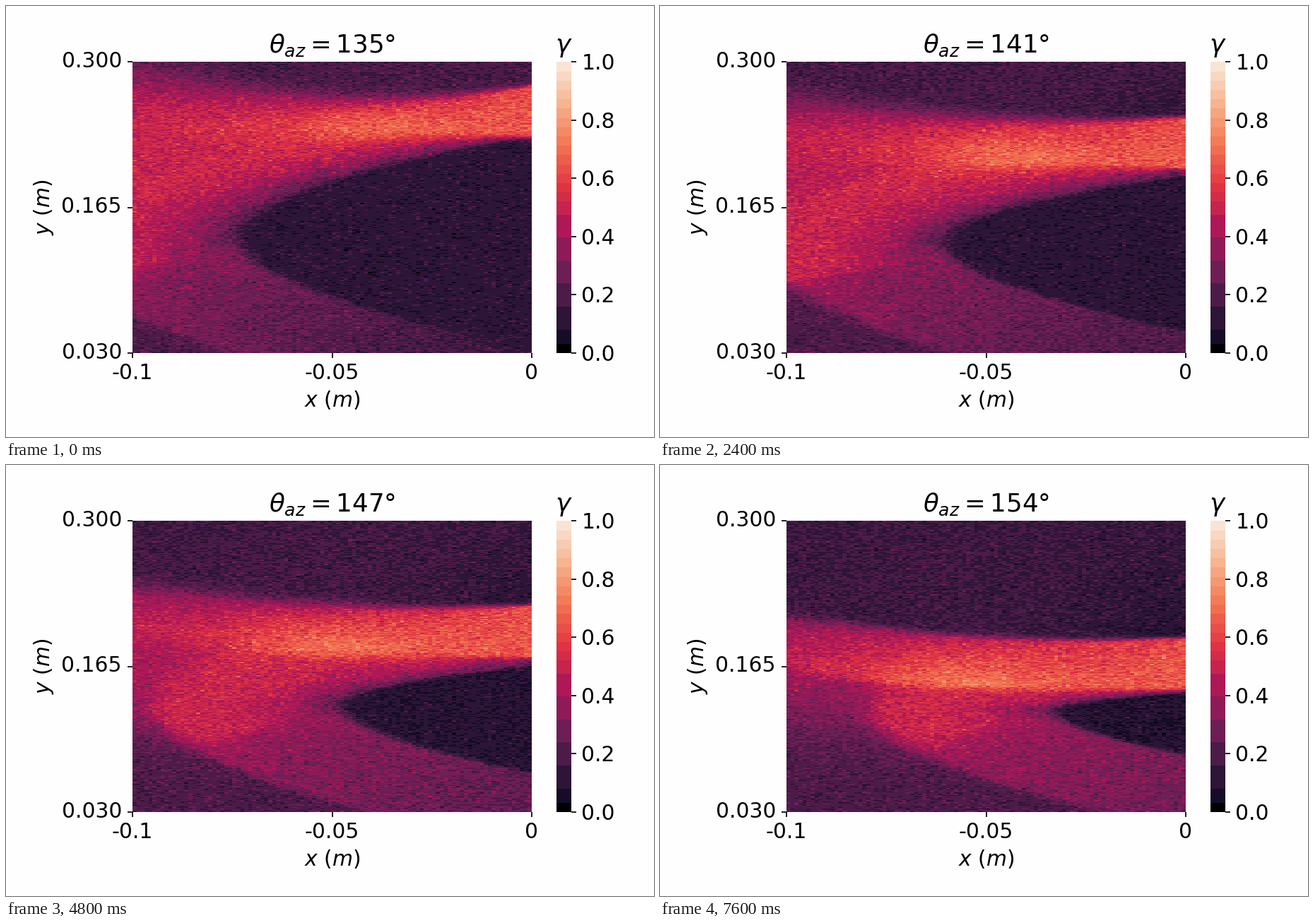
A matplotlib script for the animation above (8000 ms loop, 917 by 611 pixels).

```python
import numpy as np
import matplotlib.pyplot as plt
from matplotlib.animation import FuncAnimation
from matplotlib.colors import BoundaryNorm, LinearSegmentedColormap, ListedColormap

W, H, DPI = 917, 611, 64
FRAMES, INTERVAL = 20, 400
LEFT, RIGHT, TOP, BOTTOM = 179, 744, 79, 492
COLS, ROWS = 100, 270
SAMPLES = 100
TEXT, LARGE = 29.7, 35.65

plt.rcParams["font.family"] = "DejaVu Sans"
plt.rcParams["mathtext.fontset"] = "dejavusans"

# Colour scale: dark violet to cream, with coarser steps in the dark half
RAMP = LinearSegmentedColormap.from_list("ramp", [
    "#03051a", "#36193e", "#701f57", "#ad1759",
    "#e13342", "#f37651", "#f6b48f", "#faebdd"])
STEPS = np.r_[0, .03, .08, np.linspace(.16, .475, 5), np.linspace(.52, 1, 16)]
colors = RAMP((STEPS[:-1] + STEPS[1:]) / 2)
colors[0] = (0, 0, 0, 1)
CMAP = ListedColormap(colors)
NORM = BoundaryNorm(STEPS, len(colors))

# Cell centres in stage pixels; U runs from the right edge to the left
X, Y = np.meshgrid(LEFT + (np.arange(COLS) + .5) * (RIGHT - LEFT) / COLS,
                   TOP + (np.arange(ROWS) + .5) * (BOTTOM - TOP) / ROWS)
U = (RIGHT - X) / (RIGHT - LEFT)


def sigmoid(z):
    return 1 / (1 + np.exp(-np.clip(z, -40, 40)))


def bell(z):
    return np.exp(-z * z)


def mix(a, b, amount):
    return a + (b - a) * amount


def front(tip_x, tip_y, k_up, k_low):
    """Horizontal position, on every row, of a curve opening to the right."""
    dy = Y - tip_y
    up = (np.maximum(-dy, 0) / k_up) ** 2
    low = (np.maximum(dy, 0) / k_low) ** (1 / .6)
    return tip_x + up + low


def field(t):
    late = t / (FRAMES - 1)

    # Bright band, sagging between its ends
    start = 111.5 + 7.6 * t - .033 * t * t
    sag = 28 + 75 * np.exp(-t / 3)
    top = start - 31 * U ** 2 + sag * U * (1 - U)
    bottom = start + 75 - 8 * U * (1 - late) - 36 * U ** 4 * t / (t + 2)
    depth = np.clip((Y - top) / (bottom - top), 0, 1)
    ridge = .66 - .14 * U ** 2 + .14 * bell((U - .42 - .15 * late) / .2)
    band = mix(.62 - .27 * U, ridge, depth)

    # Dark wedge and the wider front around it
    tip_x, tip_y = 330 + 12.1 * t, 335 + .78 * t
    inner = front(tip_x, tip_y, 7.4 - .37 * t + .0045 * t * t, 4.15 - .077 * t)
    outer = front(55 + 12.5 * t, 338 + .6 * t, 8, 5.4 - .055 * t)
    f = np.clip((X - outer) / (inner - outer), 0, 1)
    upper = .51 - .31 * f ** (2.6 + 1.5 * late)
    lower = (.51 - .0013 * np.maximum(Y - tip_y, 0)
             - (.17 - .05 * late) * np.sqrt(f))
    crease = tip_y + .27 * np.maximum(tip_x - X, 0)
    glow = mix(lower, upper, sigmoid((crease - Y) / 5))
    outside = .185 + (.3 - .1 * late) * bell(np.maximum(Y - 290, 0) / 90)
    below = mix(outside, glow, sigmoid((X - outer) / 10))
    below = mix(below, .11 - .02 * late, sigmoid((X - inner) / 6))

    # Dim background above the band, darker beside its right end
    shade = (bell((RIGHT - X) / 150)
             * np.exp(-np.maximum(top - Y, 0) / (8 + 6 * t)))
    above = .18 - .025 * late - .06 * min(t / 4, 1) * shade

    under = mix(below, band, sigmoid((bottom - Y) / (1.2 + U * (18 - 15 * late))))
    return mix(above, under, sigmoid((Y - top) / (1.2 + U * (12 - 9 * late))))


def noisy(t):
    rng = np.random.default_rng(100 + t)
    return rng.binomial(SAMPLES, np.clip(field(t), 0, 1)) / SAMPLES


fig = plt.figure(figsize=(W / DPI, H / DPI), dpi=DPI, facecolor="#fefefe")
ax = fig.add_axes([0, 0, 1, 1])
ax.axis("off")


def pt(px):
    return px * 72 / DPI


def label(x, y, text, size=TEXT, ha="center", va="baseline", **kw):
    return ax.text(x, y, text, fontsize=pt(size), ha=ha, va=va,
                   color="black", **kw)


def tick(x0, y0, x1, y1):
    ax.plot([x0, x1], [y0, y1], color="black", lw=pt(1.7),
            solid_capstyle="butt")


def picture(data, box):
    return ax.imshow(data, cmap=CMAP, norm=NORM, extent=box, aspect="auto",
                     interpolation="nearest")


heat = picture(noisy(0), (LEFT, RIGHT, BOTTOM, TOP))
picture(np.linspace(1, 0, BOTTOM - TOP)[:, None], (779, 799.5, BOTTOM, TOP))
ax.set(xlim=(0, W), ylim=(H, 0))

for i, text in enumerate(("-0.1", "-0.05", "0")):
    x = LEFT + i * (RIGHT - LEFT) / 2
    tick(x, BOTTOM, x, BOTTOM + 7.4)
    label(x, 529.4, text)
for i, text in enumerate(("0.300", "0.165", "0.030")):
    y = TOP + i * (BOTTOM - TOP) / 2
    tick(LEFT - 7.4, y, LEFT, y)
    label(LEFT - 15, y + 7.6, text, ha="right")
for i in range(6):
    y = BOTTOM - i * (BOTTOM - TOP) / 5
    tick(799.5, y, 807, y)
    label(814.4, y + 11, f"{i / 5:.1f}", ha="left")

label(461.5, 568, "$x$ $(m)$")
label(54, 285.5, "$y$ $(m)$", rotation=90, va="center")
label(789.5, 66.3, r"$\gamma$", LARGE)
title = label(461.5, 66.3, "", LARGE)


def update(t):
    heat.set_data(noisy(t))
    title.set_text(rf"$\theta_{{az}} = {135 + t}$°")
    return heat, title


anim = FuncAnimation(fig, update, frames=FRAMES, interval=INTERVAL,
                     repeat=True, repeat_delay=0)
plt.show()
```
